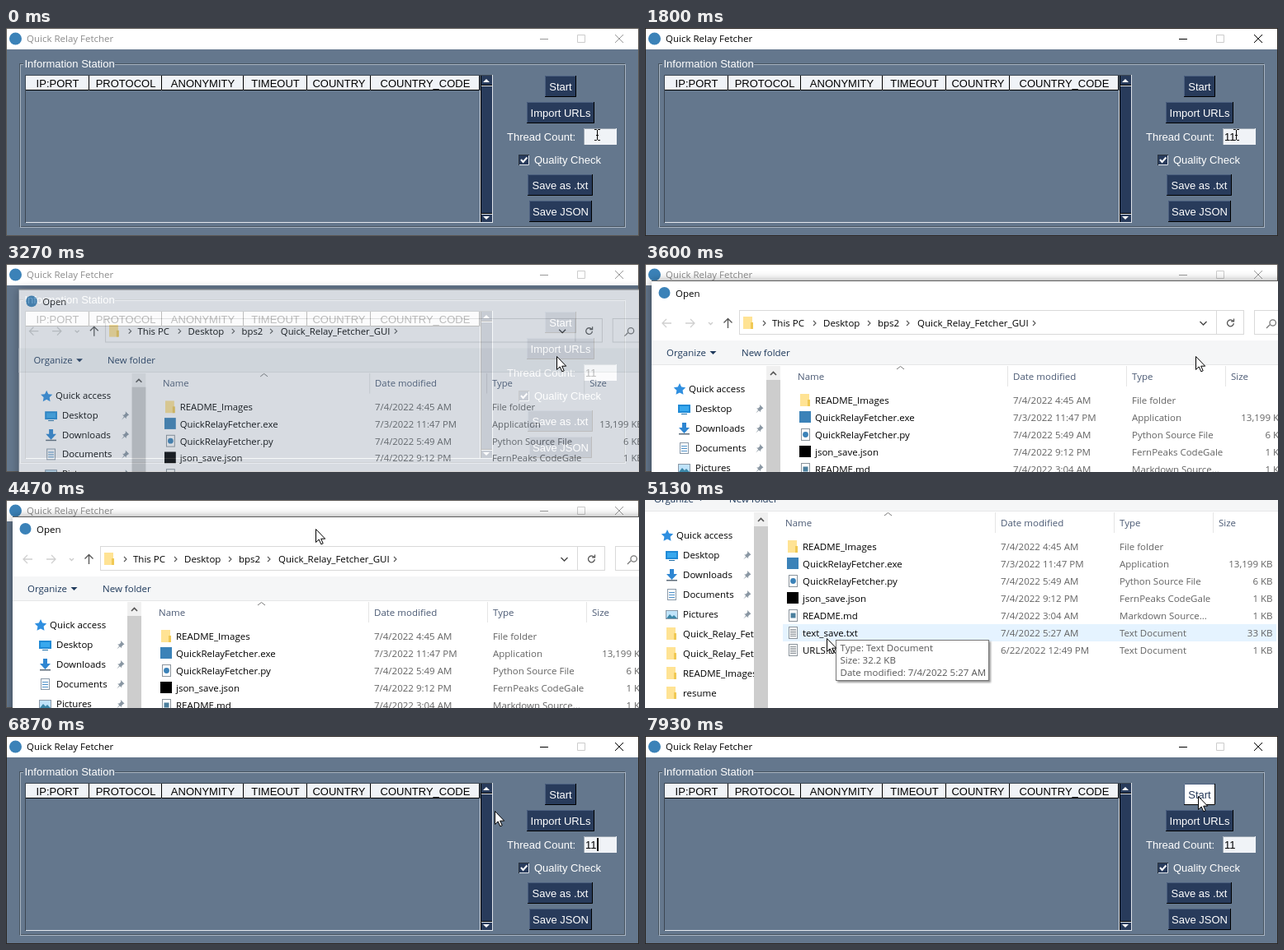
Animation, 767 px wide and 253 px high, one loop 8 s. Source, as an HTML page:

```html
<!DOCTYPE html>
<html lang="en">
<head>
<meta charset="utf-8">
<title>Quick Relay Fetcher</title>
<style>
html, body { margin: 0; width: 100%; height: 100%; overflow: hidden; background: #64778d; }
svg { display: block; width: 767px; height: 253px; }
text { white-space: pre; }
.tk { font: 13px "Liberation Sans", Arial, sans-serif; }
.ui { font: 11.5px "Open Sans", "Noto Sans", sans-serif; }
#dialog { filter: drop-shadow(0 1px 6px rgba(0, 0, 0, .45)); }
#tip { filter: drop-shadow(2px 2px 1px rgba(0, 0, 0, .4)); }
</style>
</head>
<body>
<svg id="stage" viewBox="0 0 767 253"></svg>
<script>
const NS = "http://www.w3.org/2000/svg";
const stage = document.getElementById("stage");

function el(parent, tag, attrs = {}, content) {
  const node = document.createElementNS(NS, tag);
  for (const key in attrs) node.setAttribute(key, attrs[key]);
  if (content !== undefined) node.textContent = content;
  parent.appendChild(node);
  return node;
}
const group = (p, id) => el(p, "g", id ? { id } : {});
const box = (p, x, y, w, h, fill, more) => el(p, "rect", { x, y, width: w, height: h, fill, ...more });
const frame = (p, x, y, w, h, stroke, fill = "none") =>
  box(p, x + .5, y + .5, w - 1, h - 1, fill, { stroke });
const line = (p, d, stroke, width = 1, more) =>
  el(p, "path", { d, stroke, "stroke-width": width, fill: "none", ...more });
const shape = (p, d, fill, more) => el(p, "path", { d, fill, ...more });
const dot = (p, cx, cy, r, fill) => el(p, "circle", { cx, cy, r, fill });
const label = (p, cls, x, y, str, fill, anchor = "start") =>
  el(p, "text", { class: cls, x, y, fill, "text-anchor": anchor }, str);
const show = (node, on) => node.setAttribute("visibility", on ? "visible" : "hidden");

const NAVY = "#283b5b", SLATE = "#64778d", PALE = "#f0f3f7", LOGO = "#3b82b8";

// ---- main window ----
const win = group(stage, "window");
box(win, 0, 0, 767, 253, SLATE);
box(win, 0, 0, 767, 26, "#fff");
const edge = frame(win, 0, 0, 767, 253, "#2b2724");
dot(win, 11.5, 13, 7.5, LOGO);
const title = label(win, "ui", 25, 17, "Quick Relay Fetcher", "#000");
const minimise = line(win, "M647 13.5h10", "#000");
line(win, "M692.5 8.5h9v9h-9z", "#ccc");
const closer = line(win, "M738 8l10 10M748 8l-10 10", "#000");

frame(win, 16, 43, 734, 199, "#46535f");
frame(win, 17, 44, 734, 199, "#a9b5c3");
box(win, 21, 36, 111, 15, SLATE);
label(win, "tk", 22.5, 48, "Information Station", "#fff");

line(win, "M23.5 237V57.5H590", "#3c4753");
line(win, "M24 236.5H590", "#e3e8ee");
const columns = [[24, 101, "IP:PORT"], [101, 189, "PROTOCOL"], [189, 288, "ANONYMITY"],
  [288, 365, "TIMEOUT"], [365, 442, "COUNTRY"], [442, 574, "COUNTRY_CODE"]];
for (const [a, b, name] of columns) {
  box(win, a, 58, b - a, 18, PALE);
  line(win, `M${a} 75.5H${b - .5}V58`, "#000");
  label(win, "tk", (a + b) / 2, 72, name, "#000", "middle");
}
line(win, "M574.5 76V236", "#dfe4ea");
box(win, 575, 58, 14, 178, NAVY);
line(win, "M575.5 236V58M576 69.5h13M576 225.5h13", "#000");
line(win, "M589.5 57V237M576 70.5h13M576 226.5h13", "#dfe4ea");
shape(win, "M578 66l4-4 4 4z", "#fff");
shape(win, "M578 229h8l-4 4z", "#fff");

function button(x, y, w, name) {
  const g = group(win);
  const face = box(g, x, y, w, 26, NAVY);
  line(g, `M${x + .5} ${y + 26}V${y + .5}H${x + w}`, "#4c6080");
  line(g, `M${x} ${y + 25.5}H${x + w - .5}V${y}`, "#000");
  const text = label(g, "tk", x + w / 2, y + 18, name, "#fff", "middle");
  return down => {
    face.setAttribute("fill", down ? "#fff" : NAVY);
    text.setAttribute("fill", down ? NAVY : "#fff");
  };
}
const pressStart = button(653, 58, 38, "Start");
const pressImport = button(631, 90, 82, "Import URLs");
button(632, 178, 79, "Save as .txt");
button(634, 210, 76, "Save JSON");

label(win, "tk", 607, 137, "Thread Count:", "#fff");
box(win, 700, 122, 40, 20, PALE);
line(win, "M700.5 142V122.5H739", "#9aa5b1");
const count = label(win, "tk", 702, 137, "", "#000");
const caret = box(win, 716, 124, 2, 16, "#000");
box(win, 621, 154, 13, 13, NAVY);
line(win, "M621.5 167V154.5H634", "#2a333d");
line(win, "M622 166.5H633.5V155", "#dfe4ea");
line(win, "M624 160l2.6 3 4.8-5.5", "#fff", 2);
label(win, "tk", 640, 165, "Quality Check", "#fff");

// ---- file dialog ----
const dialog = group(stage, "dialog");
box(dialog, 8, 20, 1000, 600, "#fff");
line(dialog, "M8 20.5H1008", "#5f5f5f");
dot(dialog, 23.5, 35, 7, LOGO);
label(dialog, "ui", 37, 40, "Open", "#000");

const arrow = (d, color) => line(dialog, d, color, 1.3);
arrow("M32 72H21M26 67l-5 5 5 5", "#d0d0d0");
arrow("M49 72h11M55 67l5 5-5 5", "#d0d0d0");
arrow("M77 71l2.5 2.5 2.5-2.5", "#ccc");
arrow("M100.5 78V66.5M95.5 71.5l5-5 5 5", "#555");
frame(dialog, 114, 56, 612, 30, "#d9d9d9");
line(dialog, "M692.5 57v28", "#d9d9d9");
frame(dialog, 738, 56, 250, 30, "#d9d9d9");
arrow("M672.5 70l4 4 4-4", "#444");
arrow("M712.5 69.5a3.9 3.9 0 1 0 .8 2.6M713.5 66.5v3.4h-3.4", "#555");
arrow("M753 78l4-4M757 71.5a3.7 3.7 0 1 1 7.4 0a3.7 3.7 0 1 1-7.4 0", "#777");

function folder(p, x, y) {
  box(p, x, y, 11, 15, "#ffe394");
  box(p, x + 9, y + 7, 3, 8, "#f0c955");
}
folder(dialog, 119, 64);
const crumbs = [[144, 154, "This PC"], [205, 216, "Desktop"], [271, 282, "bps2"],
  [318, 330, "Quick_Relay_Fetcher_GUI"], [471]];
for (const [c, x, name] of crumbs) {
  line(dialog, `M${c - 1} 69l3 3-3 3`, "#555", 1.1);
  if (name) label(dialog, "ui", x, 76, name, "#000");
}

box(dialog, 8, 93, 1000, 30, "#f5f6f7");
line(dialog, "M8 122.5H1008", "#e6e7e8");
label(dialog, "ui", 26, 112, "Organize", "#1e395b");
shape(dialog, "M78.5 106h8l-4 4z", "#1e395b");
label(dialog, "ui", 117, 112, "New folder", "#1e395b");

// navigation pane
const clip = el(el(stage, "defs"), "clipPath", { id: "pane" });
box(clip, 8, 123, 139, 400, "#000");
const nav = group(dialog);
nav.setAttribute("clip-path", "url(#pane)");
shape(nav, "M42 145l2.2 4.6 5 .7-3.6 3.5.9 5-4.5-2.4-4.5 2.4.9-5-3.6-3.5 5-.7z", "#2f8fe0");
label(nav, "ui", 53, 156, "Quick access", "#000");
const places = ["Desktop", "Downloads", "Documents", "Pictures",
  "Quick_Relay_Fetcher", "Quick_Relay_Fetcher_GUI", "README_Images", "resume"];
const placeIcons = [
  y => { box(nav, 40, y - 5, 15, 10, "#1f8ad6"); box(nav, 42, y - 3, 11, 6, "#38a8ee"); box(nav, 44, y + 6, 7, 1, "#1f6fa8"); },
  y => { shape(nav, `M45 ${y - 7}h5v6h4l-6.5 7-6.5-7h4z`, "#2e86d2"); box(nav, 41, y + 6, 13, 1.5, "#5c6b79"); },
  y => { frame(nav, 42, y - 7, 11, 14, "#8a99a8", "#fff"); line(nav, `M44 ${y - 2.5}h7M44 ${y + .5}h7M44 ${y + 3.5}h7`, "#4e90c8"); },
  y => { frame(nav, 40, y - 5, 15, 11, "#8a99a8", "#bfe3fa"); shape(nav, `M41 ${y + 5}l4-5 3 3 2-2 4 4z`, "#3b87a8"); }
];
places.forEach((name, i) => {
  const y = 176 + 24 * i;
  if (i < 4) {
    placeIcons[i](y);
    shape(nav, `M139 ${y - 5}l4.5 4.5-1.5.7-2 2 .2 2-2.2-2-3.8 3.4 3-4.2-2-2 2 .1 2-2z`, "#8a97a3");
  } else folder(nav, 41, y - 8);
  label(nav, "ui", 61, y + 4, name, "#000");
});
box(dialog, 147, 124, 17, 500, "#f0f0f0");
box(dialog, 147, 141, 17, 300, "#cdcdcd");
line(dialog, "M152 135l3.5-3.5 3.5 3.5", "#555", 1.6);

// file list
line(dialog, "M305 128l4.5-3.5 4.5 3.5", "#777");
for (const [x, name] of [[185, "Name"], [446, "Date modified"], [590, "Type"], [710, "Size"]]) {
  label(dialog, "ui", x, 140.5, name, "#4c5b75");
  if (x > 185) line(dialog, `M${x - 6.5} 124v25`, "#e5e5e5");
}
const rowY = i => 155 + 21 * i;
const hover = box(dialog, 182, 0, 598, 21, "#e5f3ff");
function page(y, inner) {
  frame(dialog, 189, y + 3, 11, 15, "#8b949c", "#fff");
  inner(y);
}
const fileIcon = {
  dir: y => folder(dialog, 188, y + 3),
  app: y => box(dialog, 187, y + 3, 14, 14, LOGO),
  py: y => page(y, () => dot(dialog, 194.5, y + 10.5, 3.4, LOGO)),
  json: y => box(dialog, 187, y + 3, 14, 14, "#000"),
  md: y => page(y, () => box(dialog, 191.5, y + 7.5, 6, 6, "#4b7f9d")),
  txt: y => page(y, () => line(dialog, [6.5, 8.5, 10.5, 12.5, 14.5].map(d => `M191 ${y + d}h7`).join(""), "#8b9298"))
};
const files = [
  ["dir", "README_Images", "7/4/2022 4:45 AM", "File folder", ""],
  ["app", "QuickRelayFetcher.exe", "7/3/2022 11:47 PM", "Application", "13,199 KB"],
  ["py", "QuickRelayFetcher.py", "7/4/2022 5:49 AM", "Python Source File", "6 KB"],
  ["json", "json_save.json", "7/4/2022 9:12 PM", "FernPeaks CodeGale", "1 KB"],
  ["md", "README.md", "7/4/2022 3:04 AM", "Markdown Source...", "1 KB"],
  ["txt", "text_save.txt", "7/4/2022 5:27 AM", "Text Document", "33 KB"],
  ["txt", "URLS.txt", "6/22/2022 12:49 PM", "Text Document", "1 KB"]
];
files.forEach(([icon, name, date, type, size], i) => {
  const y = rowY(i), base = y + 15, gray = "#636363";
  fileIcon[icon](y);
  label(dialog, "ui", 206, base, name, "#000");
  label(dialog, "ui", 446, base, date, gray);
  label(dialog, "ui", 590, base, type, gray);
  label(dialog, "ui", 775.5, base, size, gray, "end");
});

const tip = group(stage, "tip");
frame(tip, 231, 170, 186, 50, "#767676", "#fff");
["Type: Text Document", "Size: 32.2 KB", "Date modified: 7/4/2022 5:27 AM"]
  .forEach((str, i) => label(tip, "ui", 236.5, 183.5 + 15 * i, str, "#575757"));

// ---- pointers ----
const beam = line(stage, "M713 123.5h2.5l1 1 1-1h2.5M713 136.5h2.5l1-1 1 1h2.5M716.5 124v12M715 130.5h3", "#000");
const pointer = shape(stage, "M.5 .5V16.5L4.2 13 6.8 18.8 9.2 17.8 6.7 12.2H11.7Z", "#fff", { stroke: "#000" });

// ---- timeline: [time, values...] ----
const pathKeys = [[0, 716, 130], [1870, 716, 130], [2600, 667, 112], [3600, 667, 112],
  [4330, 375, 35], [4470, 375, 35], [4740, 360, -74], [4800, 350, -60], [4930, 217, 118],
  [5000, 218, 137], [5070, 220, 160], [5130, 220, 168], [5330, 220, 168], [5530, 212, 180],
  [5930, 212, 180], [7200, 670, 73], [8000, 670, 73]];
const dragKeys = [[4470, 0, 0], [4740, -15, -109]];
const openKeys = [[3130, 0, .97], [3200, .35, .975], [3267, .74, .985], [3333, .92, .995],
  [3400, 1, 1], [5667, 1, 1], [5733, .7, .985], [5800, .3, .97], [5867, 0, .96]];

function at(keys, t) {
  if (t <= keys[0][0]) return keys[0].slice(1);
  for (let i = 1; i < keys.length; i++) {
    const a = keys[i - 1], b = keys[i];
    if (t > b[0]) continue;
    const u = (t - a[0]) / (b[0] - a[0]), e = u * u * (3 - 2 * u);
    return a.slice(1).map((v, k) => v + (b[k + 1] - v) * e);
  }
  return keys[keys.length - 1].slice(1);
}

function draw(now) {
  const t = Math.floor((now % 8000 + 4) * 15 / 1000) * 1000 / 15;
  const active = t >= 130 && t < 3190 || t >= 5720;
  title.setAttribute("fill", active ? "#000" : "#8c8c8c");
  for (const mark of [minimise, closer]) mark.setAttribute("stroke", active ? "#000" : "#999");
  edge.setAttribute("stroke", active ? "#2b2724" : "#5c5854");

  const typed = t < 790 ? "" : t < 990 ? "1" : "11";
  count.textContent = typed;
  caret.setAttribute("x", 702 + 7 * typed.length);
  show(caret, active && (t - (t < 5000 ? 130 : 5530)) % 900 < 600);

  const [x, y] = at(pathKeys, t);
  const inField = x >= 700 && x < 740 && y >= 122 && y < 142;
  show(beam, inField);
  show(pointer, !inField);
  beam.setAttribute("transform", `translate(${Math.round(x) - 716} ${Math.round(y) - 130})`);
  pointer.setAttribute("transform", `translate(${Math.round(x)} ${Math.round(y)})`);

  pressImport(t >= 2930 && t < 3060);
  pressStart(t >= 7860);

  const [alpha, scale] = at(openKeys, t), [dx, dy] = at(dragKeys, t);
  show(dialog, alpha > 0);
  dialog.style.opacity = alpha;
  dialog.setAttribute("transform", `translate(${Math.round(dx) + 520 * (1 - scale)} ${Math.round(dy) + 720 * (1 - scale)}) scale(${scale})`);

  const row = Math.floor((y - dy - rowY(0)) / 21);
  const over = t >= 4800 && row >= 0 && row < files.length;
  show(hover, over && alpha > 0);
  if (over) hover.setAttribute("y", rowY(row));
  hover.setAttribute("fill", t >= 5520 ? "#cce8ff" : "#e5f3ff");
  show(tip, t >= 5120 && t < 5390);
}

const begin = performance.now();
function tick() {
  draw(performance.now() - begin);
  requestAnimationFrame(tick);
}
draw(0);
requestAnimationFrame(tick);
</script>
</body>
</html>
```
